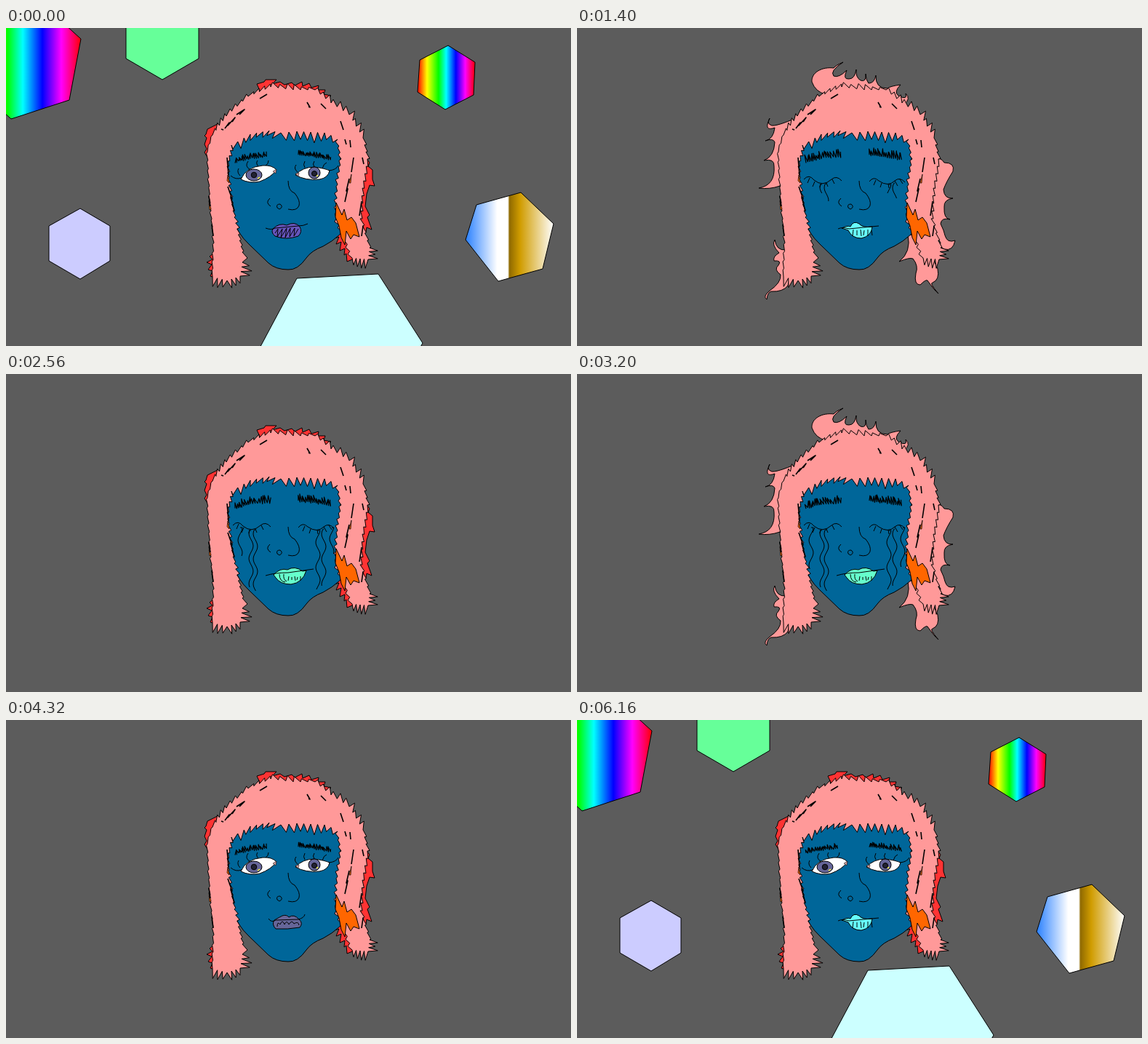
An HTML page for the animation above (6200 ms loop, 777 by 437 pixels).

```html
<!DOCTYPE html>
<html lang="en">
<head>
<meta charset="utf-8">
<title>Blue face</title>
<style>
html, body { margin: 0; width: 100%; height: 100%; overflow: hidden; background: #5c5c5c; }
svg { display: block; width: 777px; height: 437px; }
</style>
</head>
<body>
<svg id="stage" viewBox="0 0 777 437" fill="none" stroke="#000" stroke-width="1" stroke-linejoin="round">
  <defs>
    <linearGradient id="rainbow">
      <stop offset="0" stop-color="#f00"/><stop offset=".165" stop-color="#ff0"/>
      <stop offset=".365" stop-color="#0f0"/><stop offset=".498" stop-color="#0ff"/>
      <stop offset=".667" stop-color="#00f"/><stop offset=".83" stop-color="#f0f"/>
      <stop offset="1" stop-color="#f00"/>
    </linearGradient>
    <linearGradient id="chrome">
      <stop offset="0" stop-color="#2980ff"/><stop offset=".36" stop-color="#fff"/>
      <stop offset=".48" stop-color="#fff"/><stop offset=".5" stop-color="#906a00"/>
      <stop offset=".62" stop-color="#d09c00"/><stop offset="1" stop-color="#fff"/>
    </linearGradient>
  </defs>
  <g id="hexes">
    <path fill="url(#rainbow)" d="M103,15L87,99 7,125 -56,68 -40,-16 40,-42Z"/>
    <path fill="#66ff99" d="M165,-15V42L215,71 265,42V-15Z"/>
    <path fill="url(#rainbow)" d="M608,24L645,47 643,92 604,112 566,88 569,44Z"/>
    <path fill="#ccccff" d="M102,248L143,272V320L102,345 59,320V272Z"/>
    <path fill="url(#chrome)" d="M647,243L708,226 753,269 738,331 677,348 632,291Z"/>
    <path fill="#ccffff" d="M400,344L512,338 573,433 565,447H345Z"/>
  </g>
  <path id="backHair"/>
  <path fill="#006699" d="M304,135H460V283Q448,294 436,300Q420,306 413,316Q401,333 388,332Q371,332 361,323L334,297Q318,282 312,262L304,220Z"/>
  <path id="nose" d="M388,210Q388,224 397,227Q405,237 403,244Q400,252 388,249M363,234Q356,240 364,245M373,247Q371,242 377,242Q382,246 376,249Z"/>
  <path id="brows" stroke-width="1.2"/>
  <g id="openEyes">
    <path fill="#fff" d="M323,208Q330,191 353,189Q366,188 372,195Q365,205 349,211Q335,214 323,208Z"/>
    <path fill="#fff" d="M398,202Q408,191 424,191Q439,193 445,196Q443,206 431,208Q412,210 398,202Z"/>
    <path fill="#cc9999" stroke-width=".5" d="M372,194L367,197 371,200ZM398,200L403,199 402,204Z"/>
    <ellipse cx="341" cy="202" rx="11" ry="8" fill="#666699"/>
    <ellipse cx="424" cy="199" rx="8" ry="8" fill="#666699"/>
    <path id="glints" stroke="#ffff33" stroke-width="2.5"/>
    <circle cx="341" cy="202" r="3.8" fill="#223"/>
    <circle cx="424" cy="200" r="3.5" fill="#223"/>
    <path d="M309,203Q316,209 324,206M322,203Q317,198 320,193M335,194Q328,190 333,183M347,190Q343,186 346,182M357,189Q361,187 361,182M401,198Q395,193 399,188M411,192Q408,188 411,183M424,191Q421,187 424,183M435,193Q437,186 441,185M444,196Q454,195 457,189"/>
  </g>
  <path id="closedEyes" d="M318,202Q326,211 342,210Q360,207 368,196M324,206L321,209M333,209L332,215M344,210L346,216M355,207L357,212M402,201Q412,207 428,205Q441,203 449,196M408,204L406,209M418,205L419,212M430,205L434,211M440,201L445,205"/>
  <g id="cryingEyes">
    <path d="M312,208Q319,200 326,209Q338,219 350,208Q357,202 364,210M320,206L317,213M327,211L324,218M335,214L334,219M343,213L345,218M351,208L354,214M402,211Q408,203 415,210Q428,219 437,210Q444,204 451,212M411,209L408,216M419,213L417,219M428,214L429,220M437,210L441,217M444,208L448,214"/>
    <g id="tears"></g>
  </g>
  <path id="lips"/>
  <path id="lipLines"/>
  <path id="frontHair" fill="#ff9999"/>
  <path fill="#ff6600" d="M454,240L462,257 465,249 469,264 475,260 481,268 486,287 478,284 474,290 468,279 466,298 461,288 458,272 453,260Z"/>
  <path fill="#ff6600" stroke-width=".7" d="M279,237L282,249 280,250ZM475,201L474,213 472,213ZM305,202L307,213 304,210Z"/>
  <path id="strands" stroke-width="1.6" d="M301,138L307,130 305,134 315,123 311,129M317,119L328,112 321,119M296,139L299,140M349,97L359,91M414,102L418,109 416,108M433,104L440,111M460,128L464,140M466,153L468,160M473,154L474,164M478,178L475,198M472,207L468,224 470,221 466,239M490,178L492,187M489,238L486,258M491,272L489,286M304,178L306,202M305,218L311,235 309,232 314,252M279,231L281,245M283,270L285,286"/>
  <path id="extraStrands" d="M365,83L343,91 349,91 321,106 332,102 303,122 317,117 290,139M403,99Q420,88 448,95M400,103Q402,123 411,125Q406,110 409,103Q414,123 421,129Q416,111 418,105Q423,124 431,133Q427,113 428,106Q433,117 438,127Q433,105 444,101M318,266L319,300M325,285L327,314M466,135L468,190"/>
</svg>
<script>
const STEP = 40, LOOP = 6200;
const el = id => document.getElementById(id);
const set = (id, attrs) => { for (const k in attrs) el(id).setAttribute(k, attrs[k]); };
const show = (id, on) => set(id, { display: on ? 'inline' : 'none' });

function random(seed) {
  let s = seed * 7919 + 17;
  return () => (s = (s * 16807 + 11) % 2147483647) / 2147483647;
}

// Teeth along a clockwise polyline, pointing outwards and leaning forwards.
function jag(points, pitch, depth, lean, rnd) {
  let d = '';
  for (let i = 1; i < points.length; i++) {
    const [x, y] = points[i - 1], [u, v] = points[i];
    const len = Math.hypot(u - x, v - y), n = Math.max(1, Math.round(len / pitch));
    const ex = (u - x) / len, ey = (v - y) / len;
    for (let k = 1; k <= n; k++) {
      const out = depth * (.6 + .7 * rnd()), at = len * (k - .5) / n + lean * pitch;
      d += `L${(x + ex * at + ey * out).toFixed(1)},${(y + ey * at - ex * out).toFixed(1)}`
         + `L${(x + ex * len * k / n).toFixed(1)},${(y + ey * len * k / n).toFixed(1)}`;
    }
  }
  return d;
}

function frontHair() {
  const r = random(4);
  return 'M284,342'
    + jag([[284, 342], [286, 295], [281, 240], [277, 170], [284, 147]], 11, 1.5, .3, r)
    + jag([[284, 147], [303, 121], [333, 94], [364, 81]], 9, 4, .6, r)
    + jag([[364, 81], [395, 85], [425, 85], [447, 103]], 9, 6, -.4, r)
    + jag([[447, 103], [472, 119], [491, 151]], 10, 7, -.5, r)
    + jag([[491, 151], [497, 180], [490, 220], [487, 262], [500, 302]], 10, 2.5, .5, r)
    + jag([[500, 302], [498, 318], [476, 316]], 6, 11, 0, r)
    + jag([[476, 316], [466, 288], [454, 262], [456, 215], [461, 180], [456, 153]], 9, 3, .2, r)
    + jag([[456, 151], [438, 144], [400, 142], [378, 144]], 9, 13, -.1, r)
    + jag([[378, 144], [362, 141], [336, 146], [310, 161]], 10, 9, .6, r)
    + jag([[310, 161], [304, 190], [307, 225], [314, 260], [325, 308]], 8, 3, .4, r)
    + 'L332,316 325,322'
    + jag([[325, 322], [322, 341], [304, 347], [284, 342]], 7, 12, 0, r) + 'Z';
}

const backHair = [
  { fill: '#ff3333', d: 'M350,88L345,77 355,74 357,71 372,71 366,77 377,74 383,78 393,75 397,79 407,74 408,80 417,76 420,82 430,79 429,85 439,85 437,91 447,93 443,96 446,102 400,110ZM291,132L277,139 275,146 273,148 276,151 273,160 276,166 273,171 278,179 280,192 300,160ZM494,177L500,185 498,190 504,195 504,208 507,217 500,216 496,228 494,245 500,257 497,260 503,277 496,274 495,281 486,270 488,220ZM455,281L452,289 458,287 454,297 461,294 459,306 466,303 465,312 468,310 469,321 481,316 475,285ZM286,309L280,314 284,318 276,322 283,325 278,332 284,334 281,341 293,345 298,315Z' },
  { fill: '#ff9999', d: 'M350,88Q333,80 323,69L381,60Q386,72 397,72Q403,70 404,67L407,80 421,83Q430,78 438,86Q449,84 449,94Q444,99 440,94L445,105 400,110ZM291,128L286,132 272,132 273,136 279,138 271,150 276,152 271,192Q272,204 275,205Q280,199 282,180L300,160ZM494,184Q503,194 507,196Q517,210 516,229Q515,234 504,233L494,229V272Q508,274 507,288Q506,297 497,296L484,270ZM454,284L449,290 450,300H460L470,318V331L478,326 484,342 489,320 475,285ZM285,309L277,311 280,318 274,323 282,326 277,332 284,334 276,338 293,345 298,315Z' },
  { fill: '#ff9999', d: 'M366,47Q356,51 353,55C337,53 322,61 323,74Q328,88 342,91L400,112 449,106Q460,97 452,90Q455,100 442,93Q435,88 445,78Q430,80 427,83Q410,83 411,65Q409,76 401,76Q397,71 397,63Q398,75 390,72Q383,68 384,57Q382,70 374,70Q365,71 371,58Q360,69 353,66Q347,59 366,47ZM296,126Q269,137 266,133Q261,131 265,124Q256,143 272,137Q270,153 259,155Q270,151 272,157Q271,177 257,182Q272,179 271,190Q273,216 250,220Q265,222 279,217L300,160ZM494,181Q500,177 505,185Q520,185 517,197Q508,211 504,222Q505,235 517,234Q504,236 505,246Q504,262 513,263Q501,260 500,269Q505,279 506,285Q509,296 520,292Q517,307 505,304Q498,300 500,295L484,270ZM455,284Q460,308 443,321Q457,315 462,317Q470,327 466,337Q463,353 472,353Q480,345 482,347Q491,360 497,365Q484,350 489,350Q499,346 496,331L475,285ZM287,305Q274,306 272,291Q267,298 278,309Q269,314 271,320Q282,319 277,326Q270,332 280,339Q281,350 265,361Q255,369 261,373Q262,363 267,362Q283,363 290,354L298,315Z' }
];

const teeth = (x, y, n, gap, h) =>
  Array.from({ length: n }, (_, i) => `M${x + i * gap},${y + i % 2}l${i % 3 - 1},${h - i % 2 * 2}`).join('');

const upper = 'Q377,266 387,269Q397,263 408,271';
const mouths = [
  { until: 0, fill: '#6655bb', d: 'M367,276Q376,267 386,271Q397,265 404,273Q408,280 402,286Q385,292 370,286Q364,281 367,276Z',
    lines: 'M357,275Q365,278 370,275L402,272Q409,272 415,269M370,282L374,276 373,287 380,276 378,288 386,275 384,288 391,275 390,287 397,275 396,286 402,276' },
  { until: 2, fill: '#66ffff', d: 'M364,275Q372,271 376,273Q380,264 388,269Q393,275 406,273Q405,286 391,289Q378,289 373,278Z',
    lines: 'M359,276Q365,273 374,276L415,272' + teeth(380, 277, 6, 5, 9) },
  { until: 5, fill: '#6666cc', d: 'M363,275Q378,266 387,269Q398,266 407,272Q408,287 397,291Q384,294 377,281L374,275Z',
    lines: 'M360,276Q375,273 390,272L422,272M392,287Q389,279 396,275Q401,279 394,286M396,286Q403,280 401,275' },
  { until: 9, fill: '#666699', d: 'M369,275Q376,271 380,269Q386,267 389,271Q396,266 403,274Q409,279 404,285Q387,288 371,287Q365,281 369,275Z',
    lines: 'M361,273Q365,279 371,275L402,274Q410,272 411,267M373,284Q373,276 377,281Q380,273 383,281Q386,274 389,281Q393,274 396,280Q402,276 403,282' },
  { until: 11, fill: '#6633cc', d: 'M367,275Q376,265 387,269Q399,263 413,270Q406,278 400,288Q388,295 377,287Q373,280 367,275Z',
    lines: 'M362,272Q367,277 374,274Q391,270 419,269' + teeth(379, 275, 6, 4, 9) },
  { until: 13, fill: '#66ffcc', d: 'M368,276' + upper + 'L413,270Q408,287 392,289Q377,289 371,280Z',
    lines: 'M357,277Q370,273 388,273L423,268M376,275Q376,285 384,286M382,275Q381,283 386,285' + teeth(389, 278, 5, 4, 6) },
  { until: 16, fill: '#6699cc', d: 'M365,273' + upper + 'L414,272Q405,287 391,288Q379,289 370,276Z',
    lines: 'M362,273Q381,274 417,272' + teeth(376, 274, 8, 4, 7) }
];

function brow(points, height, rnd) {
  let d = '';
  for (let i = 1; i < points.length; i++) {
    const [x, y] = points[i - 1], [u, v] = points[i];
    for (let k = 0; k < 9; k++) {
      const p = k / 9, px = x + (u - x) * p, py = y + (v - y) * p;
      d += `${d ? 'L' : 'M'}${px.toFixed(1)},${(py + 2 * rnd()).toFixed(1)}`
         + `L${(px - 2 + 4 * rnd()).toFixed(1)},${(py - height * (.5 + .6 * rnd())).toFixed(1)}`;
    }
  }
  return d;
}

function brows(frame, crying) {
  const r = random(frame % 12 + 1), h = crying ? 9 : 6, lift = crying ? 0 : 3 * r();
  return brow([[315, 184 - lift], [336, 178], [361 + (crying ? 5 : 0), 176 - lift / 2]], h, r)
       + brow([[402, 174 - lift / 2], [424, 176], [449, 181 - lift]], h, r);
}

// Tears: x, top, bottom, start and end of the fall in ms.
const tears = [[343, 214, 300, 1240, 1800], [337, 215, 296, 1300, 1900], [322, 211, 269, 1500, 3000],
  [429, 215, 298, 1300, 1900], [437, 213, 293, 1240, 1800], [448, 211, 266, 1600, 3000]];

function tearPath([x, top, bottom, start, end], t) {
  const reach = top + (bottom - top) * Math.min(1, Math.max(0, (t - start) / (end - start)));
  let d = `M${x},${top}`;
  for (let y = top; y < reach; y += 3)
    d += `L${(x + 3 * Math.sin((y - top) / 5.5 + x)).toFixed(1)},${y}`;
  return `<path d="${d}"/>`;
}

set('frontHair', { d: frontHair() });

function draw(now) {
  const frame = Math.floor(now % LOOP / STEP), t = frame * STEP;
  const closed = t >= 720 && t < 3840, crying = closed && t >= 1280;
  show('hexes', t < 720 || t >= 5480);
  show('openEyes', !closed);
  show('closedEyes', closed && !crying);
  show('cryingEyes', crying);
  show('extraStrands', t >= 5040 && t < 5480);
  set('backHair', backHair[Math.floor(frame / 3) % 3]);
  set('brows', { d: brows(frame, crying) });
  const high = t >= 5040 && t < 5480;
  set('glints', { d: high ? 'M342,196l6,4M425,194l5,5' : 'M346,207l3,-2M427,204l2,-2', 'stroke-width': high ? 3.5 : 1.5 });
  el('tears').innerHTML = crying ? tears.map(tear => tearPath(tear, t)).join('') : '';
  const mouth = mouths.find(m => frame % 17 <= m.until);
  set('lips', { d: mouth.d, fill: mouth.fill });
  set('lipLines', { d: mouth.lines });
}

const begin = performance.now();
function tick() {
  draw(performance.now() - begin);
  requestAnimationFrame(tick);
}
draw(0);
tick();
</script>
</body>
</html>
```
